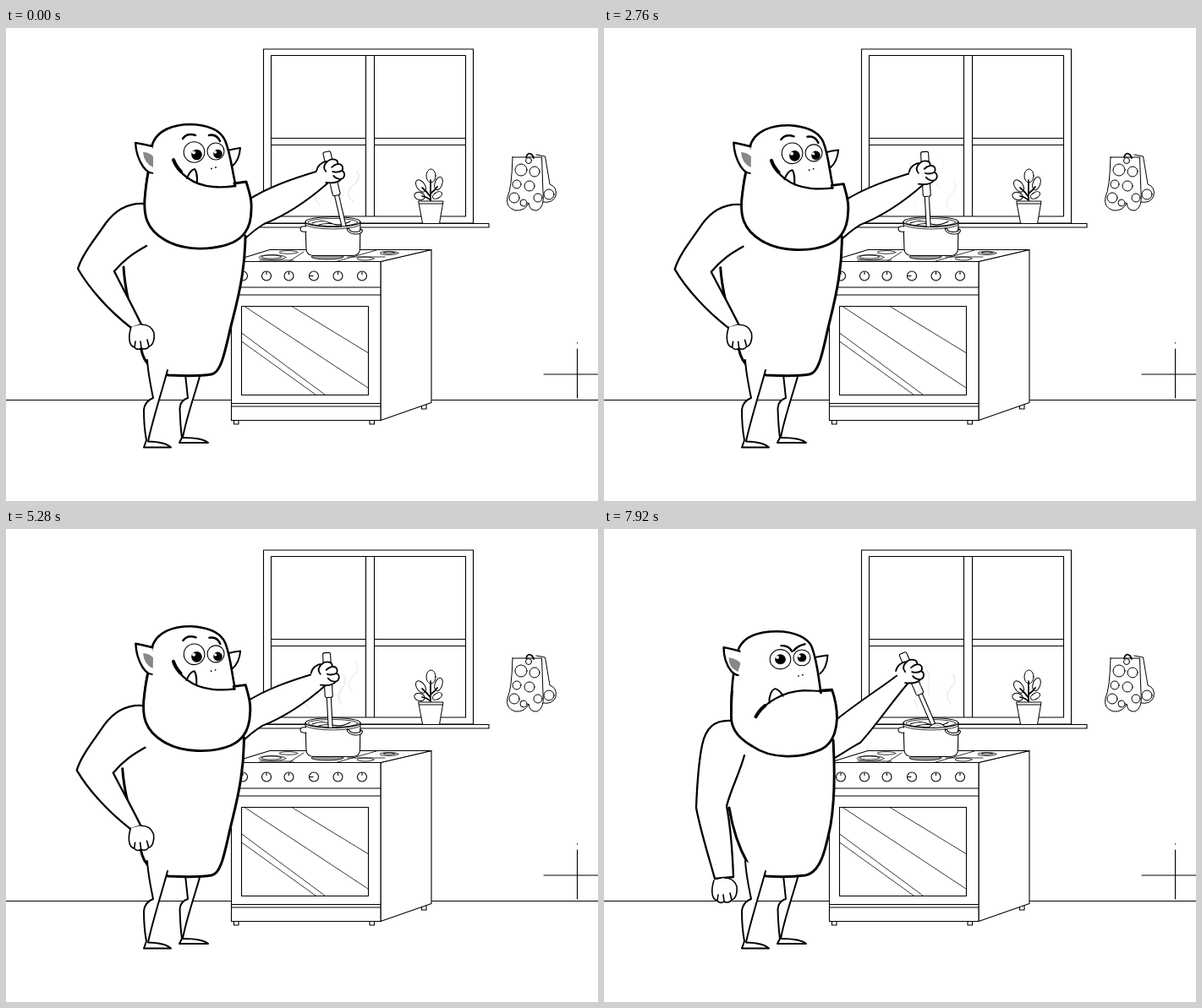
An HTML page for the animation above (8 s loop, 700 px wide and 560 px high).

```html
<!DOCTYPE html>
<html lang="en">
<head>
<meta charset="utf-8">
<title>Ogre at the stove</title>
<style>
html, body { margin: 0; width: 100%; height: 100%; overflow: hidden; background: #fff; }
svg { display: block; width: 100%; height: 100%; }
svg * { stroke-linecap: round; stroke-linejoin: round; }
.thin { fill: #fff; stroke: #000; stroke-width: 1.1; }
.hair { fill: none; stroke: #000; stroke-width: .8; }
.ink { fill: #fff; stroke: #000; stroke-width: 2; }
.line { fill: none; stroke: #000; }
</style>
</head>
<body>
<svg viewBox="0 0 700 560">
  <defs><clipPath id="soup"><rect x="300" y="60" width="160" height="175"/></clipPath></defs>

  <g class="thin">
    <path d="M0 440.5H700"/>
    <path d="M304.5 25H552.5V231H304.5Z"/>
    <path d="M313.5 32.5H543.5V223H313.5ZM425.5 32.5V223M435.5 32.5V223M313.5 130.5H425.5M435.5 130.5H543.5M313.5 138.5H425.5M435.5 138.5H543.5"/>
    <path d="M293 231.5H571V236H293Z"/>
    <path d="M636 410H700M675.5 380V438M675.5 372.5V373"/>
  </g>

  <g class="thin" style="stroke-width:1">
    <ellipse cx="502.5" cy="175" rx="5.5" ry="8"/>
    <ellipse cx="490.5" cy="187" rx="4.8" ry="8" transform="rotate(-35 490.5 187)"/>
    <ellipse cx="511.5" cy="184" rx="4.3" ry="8" transform="rotate(18 511.5 184)"/>
    <ellipse cx="489" cy="199" rx="6.3" ry="4.5" transform="rotate(15 489 199)"/>
    <ellipse cx="510" cy="198" rx="6" ry="3.5" transform="rotate(-30 510 198)"/>
    <path class="line" d="M502 206V180M502 200Q498 194 492 189M502 196Q507 192 510 188M502 204Q498 200 492 199" style="stroke-width:1.7"/>
    <path d="M488 205H517L512.5 231.5H493ZM488.500 208H516.500"/>
  </g>

  <g class="thin" style="stroke-width:1">
    <path d="M627 150L637.5 152L643 185Q652 188 650 199Q646 208 635 206"/>
    <path d="M599 153H633.5L635 195Q637 212 628 216Q619 217 618 207Q614 217 602 216Q590 212 593 200Q598 190 599 153Z"/>
    <path class="line" d="M615 153Q617 146 622 150L624 154" stroke-width="1.8"/>
    <g id="dots"></g>
  </g>

  <g class="thin">
    <path d="M269.5 463V469H275V463M430 463V469H435.5V463M491.5 444V451H497V444"/>
    <path d="M443 276.5L503 262.5V443.5L443 464.5Z"/>
    <path d="M266.5 276.5L312 262.5H503L443 276.5Z"/>
    <path d="M266.5 276.5H443V464.5H266.5ZM266.5 307H443M266.5 316H443M266.5 444.5H443M266.5 448H443"/>
    <path d="M278.5 329.5H428.5V434.5H278.5Z"/>
  </g>
  <g class="hair">
    <path d="M338 329.5L428 384.5M282 329.5L428 426M278.5 361L377 434M278.5 371L366 434" stroke-dasharray="1.6 .7"/>
    <ellipse cx="315" cy="271.5" rx="16" ry="3"/><ellipse cx="314" cy="271" rx="12" ry="2"/>
    <ellipse cx="334" cy="265.5" rx="11" ry="1.8"/><ellipse cx="425" cy="273" rx="10" ry="2"/>
    <ellipse cx="453" cy="266.5" rx="11" ry="2"/><ellipse cx="453" cy="266" rx="7" ry="1"/>
    <path d="M335 276L352 265M392 276L438 263M404 271H448M300 275H340"/>
    <ellipse cx="380" cy="271" rx="19" ry="3" fill="#999"/>
  </g>
  <g id="knobs" class="thin"></g>

  <g class="thin">
    <ellipse cx="386.5" cy="229.5" rx="32.5" ry="6"/>
    <ellipse cx="386.5" cy="230" rx="29.5" ry="4.5" fill="none" stroke-width=".8"/>
    <path class="line" d="M362 231Q374 226 384 231T407 229M370 233Q380 230 393 233" stroke-width="1.2"/>
  </g>
  <g clip-path="url(#soup)">
    <g id="ladle" class="thin">
      <path id="rod"/>
      <g id="bowl"><circle r="12"/><ellipse cx="1" cy="1" rx="9" ry="10" stroke="#888" stroke-width=".7"/></g>
      <rect x="-4.5" y="0" width="9" height="53" rx="2"/>
      <path class="line" d="M-4.5 11H4.5"/>
    </g>
  </g>
  <g class="thin">
    <path d="M354 229.5A32.5 6 0 0 0 419 229.5L418.5 262Q418 269 410 269.5H364Q355.5 269 355 262Z"/>
    <path class="line" d="M354.5 233A32.5 6 0 0 0 418.5 233" stroke-width=".8"/>
    <path d="M355 235Q348 234 348 238Q348 242 355 241"/>
    <path d="M403 237Q404 243 412 244Q421 244.500 421.5 239.5Q419 237 419 238.500Q420 241.500 412 241.500Q406 241 406 238Z"/>
  </g>
  <g id="steam" fill="none" stroke="#ccc" stroke-width="1.6"></g>

  <path class="ink" d="M212 410L215 438Q206 441 205.5 450Q206 470 208 485L205 491H239Q232 485 209 485C213 462 223 435 230 409"/>
  <g id="torso">
    <path id="reach" class="ink"/>
    <g id="grip" class="ink" style="stroke-width:1.8">
      <path d="M-17 2C-17 -6 -10 -11 -4 -11C0 -15 9 -14 8 -8C14 -8 15 -3 13 0C18 3 16 9 12 10C9 14 2 15 -6 14Q-13 12 -17 2Z" stroke="none"/>
      <path class="line" d="M-17 0C-16 -6 -10 -11 -4 -11C0 -15 9 -14 8 -8C14 -8 15 -3 13 0C18 3 16 9 12 10C9 14 2 15 -6 14M8 -8Q4 -7 1 -4M13 0Q7 3 2 1M12 10Q6 10 3 6M-4 -11Q-11 -5 -6 1"/>
    </g>
    <path id="belly" class="ink" style="stroke-width:3"/>
  </g>
  <path class="ink" d="M167 393C168 410 172 428 174 438Q164 442 163 452Q163 472 166 488L163 496.5H195Q188 490 168 489.5C173 465 183 435 191 405"/>
  <g id="side">
    <path id="arm" class="ink" style="stroke-width:2.3"/>
    <g id="fist" class="ink" style="stroke-width:1.6">
      <path d="M-12 -12C-15 -3 -16 10 -8 12C-6 15 -2 15 0 13C3 15 7 14 9 11C14 10 16 2 15 -5C13 -11 8 -15 0 -15"/>
      <path d="M-8 12L-7 5M0 13L-1 5M9 11L7 3"/>
    </g>
  </g>
  <g id="nod">
    <g id="head">
      <path id="earR" class="ink"/>
      <path id="skull" class="ink" style="stroke-width:2.6"/>
      <path id="earL" class="ink" style="stroke-width:2.4"/>
      <path id="inner" fill="#888"/>
      <path id="jaw" class="ink" style="stroke-width:2.9"/>
      <path id="fang" class="ink"/>
      <path id="mouth" class="line" stroke-width="2.3"/>
      <path id="lip" class="line" stroke-width="4"/>
      <g id="eyeL"><circle r="12.3" class="thin"/><g id="lookL"><circle r="6.3"/><circle cx="-3.5" cy="-2.5" r="2" fill="#fff"/></g></g>
      <g id="eyeR"><circle r="10" class="thin"/><g id="lookR"><circle r="5.3"/><circle cx="-3" cy="-2" r="1.7" fill="#fff"/></g></g>
      <path id="browL" class="line" stroke-width="2.5"/>
      <path id="browR" class="line" stroke-width="2.5"/>
      <g id="nose"><circle cx="-2.5" cy="1" r=".9"/><circle cx="2.5" cy="-.5" r=".9"/></g>
    </g>
  </g>
</svg>
<script>
const LOOP = 8000, STEP = 120, STIR = 840, WISPS = 5;
const $ = id => document.getElementById(id);

$('dots').innerHTML = [[609, 168, 7], [625, 170, 6], [604, 185, 5], [619, 187, 6], [601, 201, 6],
  [629, 201, 5], [612, 207, 4], [642, 197, 6], [618, 157, 3.5]]
  .map(([x, y, r]) => `<circle cx="${x}" cy="${y}" r="${r}"/>`).join('');
$('knobs').innerHTML = [280, 308, 334.5, 364, 392.5, 421]
  .map((x, i) => `<circle cx="${x}" cy="293.5" r="5.5"/><path d="${i === 3 ? `M${x - 5} 293.5h4` : `M${x} 289v2.5`}"/>`).join('');
$('steam').innerHTML = '<path/>'.repeat(WISPS);

const smile = {
  skull: 'M164 205C165 185 170 160 172 142C176 120 200 114 219 114C240 115 254 122 259 133C266 150 267 168 272 188',
  jaw: 'M271 187L270 184L284 182C288 195 291 205 290 215C290 240 278 249 268 254C245 264 210 264 188 251C165 238 163 220 164 203C165 190 166 182 168 172',
  mouth: 'M198 156C204 172 220 186 245 188C255 189 265 188 271 187',
  lip: 'M198 156Q201 164 207 170',
  fang: 'M214 178C216 172 220 167 223 167C226 170 226 176 226 184',
  earL: 'M173 140Q160 137 153 136Q154 152 162 164Q168 172 173 172',
  inner: 'M162 147Q169 147 174 152L174 165Q163 160 162 147',
  earR: 'M262 145Q270 143 277 142Q276 156 268 163',
  browL: 'M209 131Q214 124 224 127',
  browR: 'M240 127Q249 125 253 134',
  eyeL: 'translate(222.5 147)', eyeR: 'translate(248 146)',
  lookL: 'translate(3 3)', lookR: 'translate(2.5 3)',
  nose: 'translate(245.5 165.5)'
};
const frown = {
  skull: 'M152 205C151 180 154 140 161 118C168 102 185 97 206 97C228 97 243 106 247 116C254 135 255 155 258 174',
  jaw: 'M258 174L257 171L271 170C275 182 277 195 277 206C276 230 268 240 258 245C235 256 200 258 177 241C156 228 151 215 152 200C152 190 152 182 153 172',
  mouth: 'M181 204C190 188 212 172 238 171C248 171 258 173 271 171',
  lip: 'M181 204Q185 196 192 190',
  fang: 'M197 187C196 178 200 170 204 169C208 170 212 175 213 178',
  earL: 'M162 122Q150 118 143 117Q143 135 152 147Q157 152 160 152',
  inner: 'M149 130Q158 131 163 137L160 148Q149 143 149 130',
  earR: 'M249 130Q258 128 266 127Q265 143 257 150',
  browL: 'M211 115Q219 114 224 122',
  browR: 'M226 121Q230 115 239 113',
  eyeL: 'translate(210 132)', eyeR: 'translate(235.5 130)',
  lookL: 'translate(0 0)', lookR: 'translate(0 0)',
  nose: 'translate(234 152)'
};

// ladle: handle top x y, bowl centre x y; sway: strength of the stirring
const stir = {
  ...smile, head: 'translate(0 0) rotate(0 220 150) scale(1 1)', fist: 'translate(160 366)', ladle: '379 146.5 393.5 248', sway: '1',
  arm: 'M163 208C145 207 130 215 118 231C105 250 90 268 85 285C98 308 122 335 148 355L160 351C150 330 138 308 128 288C140 274 150 267 166 258',
  belly: 'M139 283C141 318 152 350 160 381C163 397 175 408 192 411C212 412 232 412 243 410C256 408 260 375 268 345C277 310 283 280 283 246',
  reach: 'M284 205C310 188 340 178 370 169L380 184C355 206 330 222 305 232C297 237 290 242 280 252'
};
const squash = {
  ...smile, head: 'translate(0 16) rotate(1.2 220 150) scale(1 .973)', fist: 'translate(160 370)', ladle: '372 147 385 248', sway: '0',
  arm: 'M163 217C143 218 130 226 118 240C105 258 88 276 83 294C96 313 122 338 148 358L160 356C150 335 138 312 127 295C139 281 150 274 166 265',
  belly: 'M138 290C140 322 152 352 160 383C163 399 175 411 192 415C212 415 232 415 243 412C254 408 260 375 267 345C276 310 281 285 280 254',
  reach: 'M280 204C305 195 330 182 361 168L374 182C348 208 325 226 300 236C290 240 285 247 278 253'
};
const tall = {
  ...frown, head: 'translate(0 0) rotate(0 220 150) scale(1 1)', fist: 'translate(145 417)', ladle: '354.5 122 391.5 222', sway: '0',
  arm: 'M152 208C135 207 125 222 119 244C113 270 107 295 104 318C112 345 124 375 134 405L152 403C149 375 148 345 140 314C149 292 158 275 165 254',
  belly: 'M142 312C146 345 154 372 164 392C170 400 180 405 192 408C205 409 225 409 238 407C256 406 262 380 267 345C272 310 273 270 271 236',
  reach: 'M275 207C300 190 322 165 346 149L366 159C345 195 325 218 303 236C293 243 283 247 271 254'
};
const peak = { ...tall, head: 'translate(0 -3.5) rotate(0 220 150) scale(1 1)', ladle: '354.5 119 391.5 219' };
const low = {
  ...frown, head: 'translate(-1.5 29.5) rotate(0 220 150) scale(1 .945)', fist: 'translate(142 428)', ladle: '353 147 394 242', sway: '0',
  arm: 'M150 227C130 226 120 236 116 256C111 280 110 305 109 330C114 357 123 385 131 414L153 412C152 385 150 355 145 328C150 308 160 290 166 268',
  belly: 'M148 330C152 355 160 378 170 396C174 403 182 409 192 411C206 412 224 412 238 410C256 407 262 380 268 350C273 320 273 285 271 250',
  reach: 'M272 228C300 205 325 190 347 173L360 182C340 205 320 235 303 253C293 258 285 264 271 272'
};

const smooth = k => k * k * (3 - 2 * k);
const easeOut = k => 1 - (1 - k) ** 2;
const keys = [[0, stir], [5880, stir, smooth], [6240, squash, smooth], [6720, squash, smooth],
  [7080, peak, smooth], [7320, tall, smooth], [LOOP - 80, low, easeOut], [LOOP, low, smooth]];

const numbers = /-?(?:\d+\.?\d*|\.\d+)/g;
function blend(a, b, k) {
  const to = b.match(numbers);
  let i = 0;
  return a.replace(numbers, v => +(+v + (to[i++] - v) * k).toFixed(3));
}

function poseAt(t) {
  const n = keys.findIndex(key => key[0] > t);
  const [t0, from] = keys[n - 1], [t1, to, ease] = keys[n];
  const k = ease((t - t0) / (t1 - t0)), pose = {};
  for (const part in from) pose[part] = blend(from[part], to[part], k);
  return pose;
}

function drawLadle(x, y, bx, by) {
  const len = Math.hypot(bx - x, by - y), ux = (bx - x) / len, uy = (by - y) / len;
  const turn = Math.atan2(uy, ux) * 180 / Math.PI - 90;
  $('ladle').setAttribute('transform', `translate(${x} ${y}) rotate(${turn})`);
  $('rod').setAttribute('d', `M-2.5 50V${len - 8}H2.5V50Z`);
  $('bowl').setAttribute('transform', `translate(0 ${len})`);
  $('grip').setAttribute('transform', `translate(${x + ux * 23} ${y + uy * 23})`);
}

function drawSteam(t) {
  [...$('steam').children].forEach((wisp, i) => {
    const p = (t / 1600 + i * .37) % 1;
    const x = 358 + i * 13, y = 224 - 40 * p, bend = 5 * Math.sin(t / 400 + i * 2);
    wisp.setAttribute('d', `M${x} ${y}q${-6 - bend} -9 0 -18t${bend} -17`);
    wisp.setAttribute('opacity', .4 * Math.sin(Math.PI * p));
  });
}

function draw(t) {
  const { ladle, sway, ...parts } = poseAt(t);
  for (const id in parts) {
    const value = parts[id];
    $(id).setAttribute(value[0] === 'M' ? 'd' : 'transform', value);
  }
  // while stirring the body leans about the hips and the head tips the other way
  const swing = Math.cos(2 * Math.PI * t / STIR + .67);
  const tip = (.78 - swing) * sway, dx = -1.3 * tip;
  const lean = `matrix(1 0 ${-dx / 200} ${1 - tip / 300} ${dx * 411 / 200} ${tip * 411 / 300})`;
  $('torso').setAttribute('transform', lean);
  $('side').setAttribute('transform', lean);
  $('nod').setAttribute('transform', `translate(0 ${.8 * tip}) rotate(${.8 * tip} 220 150)`);

  const [x, y, bx, by] = ladle.split(' ').map(Number);
  drawLadle(x, y, bx + 11.7 * swing * sway, by);
  drawSteam(t);
}

function tick(now) {
  draw(Math.floor(now % LOOP / STEP) * STEP);
  requestAnimationFrame(tick);
}
draw(0);
requestAnimationFrame(tick);
</script>
</body>
</html>
```
